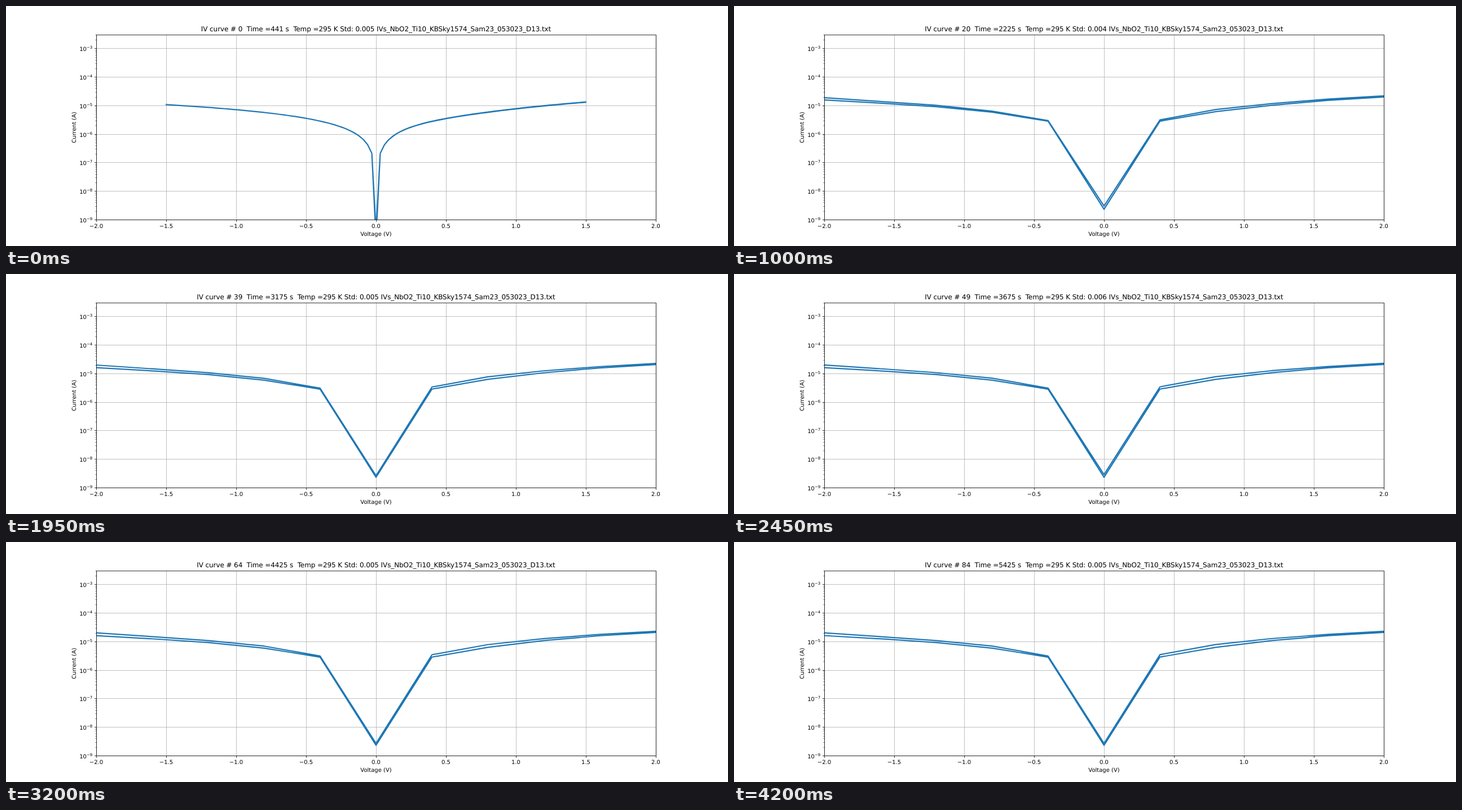
These frames come from a looping animation (1280 px wide and 427 px high, 4.25 s). An HTML page:

```html
<!DOCTYPE html>
<html lang="en">
<head>
<meta charset="utf-8">
<title>IV curve</title>
<style>
  html, body { margin: 0; width: 100%; height: 100%; overflow: hidden; background: #fff; }
  svg { display: block; width: 100vw; height: 100vh; }
  text { font: 10px "DejaVu Sans", sans-serif; text-rendering: geometricPrecision; white-space: pre; }
  #title { font-size: 12px; letter-spacing: -.1px; }
  .mid { text-anchor: middle; }
  .end { text-anchor: end; }
  .sup { font-size: 7px; }
  .grid { stroke: #b0b0b0; stroke-width: .8; }
  .axis { stroke: #000; stroke-width: .8; fill: none; }
  .minor { stroke: #000; stroke-width: .6; }
  #curve { fill: none; stroke: #1f77b4; stroke-width: 2.2; stroke-linejoin: round; stroke-linecap: square; }
</style>
</head>
<body>
<svg viewBox="0 0 1280 427">
  <clipPath id="plot"><rect x="160" y="51.24" width="992" height="328.79"/></clipPath>
  <g id="grid"></g>
  <g clip-path="url(#plot)"><path id="curve"/></g>
  <g id="axes"></g>
  <text id="title" class="mid" x="656" y="45.2"></text>
  <text class="mid" x="656" y="408.5">Voltage (V)</text>
  <text class="mid" transform="translate(123.8 216) rotate(-90)">Current (A)</text>
</svg>
<script>
const STEP_MS = 50, STEPS = 85;
const DECADE = 328.79 / Math.log10(3e6);
const $ = id => document.getElementById(id);
const xOf = volts => 656 + 248 * volts;
const yOf = amps => 380.03 - DECADE * Math.log10(amps / 1e-9);
const snap = v => Math.floor(v + .49) + .5;

function add(parent, tag, attrs, text = '') {
  const el = document.createElementNS('http://www.w3.org/2000/svg', tag);
  for (const key in attrs) el.setAttribute(key, attrs[key]);
  el.textContent = text;
  return parent.appendChild(el);
}
const line = (parent, cls, x1, y1, x2, y2) => add(parent, 'line', { class: cls, x1, y1, x2, y2 });

function drawAxes() {
  const grid = $('grid'), axes = $('axes');
  for (let v = -2; v <= 2; v += .5) {
    const x = snap(xOf(v));
    line(grid, 'grid', x, 51.5, x, 380.5);
    line(axes, 'axis', x, 380.5, x, 384);
    add(axes, 'text', { class: 'mid', x: xOf(v), y: 395 }, v.toFixed(1).replace('-', '\u2212'));
  }
  for (let p = -9; p <= -3; p++) {
    const y = snap(yOf(10 ** p));
    line(grid, 'grid', 160.5, y, 1152.5, y);
    line(axes, 'axis', 157, y, 160.5, y);
    const label = add(axes, 'text', { class: 'end', x: 153.3, y: y + 4.2 }, '10');
    add(label, 'tspan', { class: 'sup', dy: -3.8 }, '\u2212' + -p);
    for (let m = 2; m <= (p === -3 ? 3 : 9); m++) {
      const my = snap(yOf(m * 10 ** p));
      line(axes, 'minor', 158.5, my, 160.5, my);
    }
  }
  add(axes, 'rect', { class: 'axis', x: 160.5, y: 51.5, width: 992, height: 329 });
}

// sweep number, elapsed seconds, standard deviation, height of the upper zero point
const readings = [
  [0, 441, .005, 356], [10, 989, .006, 356], [14, 1208, .005, 356], [15, 1975, .005, 356],
  [20, 2225, .004, 356], [39, 3175, .005, 359], [49, 3675, .006, 357],
  [64, 4425, .005, 358.5], [84, 5425, .005, 358.5]
];
function readingAt(n) {
  const i = Math.max(1, readings.findIndex(r => r[0] >= n));
  const a = readings[i - 1], b = readings[i], f = (n - a[0]) / (b[0] - a[0]);
  return a.map((v, k) => v + (b[k] - v) * f);
}

const toPath = points => 'M' + points.map(p => p[0].toFixed(2) + ' ' + p[1].toFixed(2)).join('L');

// Current through the device for a fine sweep, ohmic with a rise at positive bias
function current(v, lag) {
  if (v < 0) return -v * (7.05e-6 + .07e-6 * -v);
  const t = Math.min(1, Math.max(0, (v - .4) / 1.7));
  return v * (6.95e-6 + 2.55e-6 * t * t * (3 - 2 * t)) * (1 + lag * Math.sin(Math.PI * v / 2));
}
function fineBranch(limit, step, firstLeft, zero, lag) {
  const volts = [];
  for (let v = firstLeft; v < limit; v += step) volts.unshift(-v);
  volts.unshift(-limit);
  volts.push(0);
  for (let v = step; v < limit - 1e-6; v += step) volts.push(v);
  volts.push(limit);
  return toPath(volts.map(v => [xOf(v), yOf(v ? current(v, lag) : zero)]));
}

// Heights at 0.4 V spacing: start value, and how far each branch drifts up
const coarse = {
  upperLeft: [163.3, 170, 176.9, 187.3, 204.1],
  leftDrift: [1.5, 1.5, 1.4, 2, 1.1],
  lowerLeft: [167.3, 173, 179.4, 189.2, 205],
  upperRight: [202.8, 184.4, 173.8, 165.8, 160],
  rightDrift: [2.2, 1.8, 1.9, 1.2, 1],
  lowerRight: [205, 188, 176.8, 168.1, 162],
  leftSettle: [.6, .6, .4, .2, 0],
  rightSettle: [.1, .5, 1.2, 1.2, 1]
};
function coarseBranch(left, leftMove, zero, right, rightMove, drift) {
  const moved = (ys, move) => ys.map((y, i) => y - move[i] * drift);
  const ys = [...moved(left, leftMove), zero, ...moved(right, rightMove)];
  return toPath(ys.map((y, i) => [xOf(-2 + .4 * i), y - .2]));
}

function curvePath(n, zero) {
  if (n < 5) return fineBranch(1.5, .03, .03, 2e-10, -.015) + fineBranch(1.5, .03, .03, 4e-10, .01);
  if (n < 15) return fineBranch(2, .06, .06, 1.3e-9, -.03) + fineBranch(2, .06, .04, 8e-11, .02);
  const drift = n < 20 ? 0 : 1 - Math.exp((20 - n) / 15), c = coarse;
  return coarseBranch(c.upperLeft, c.leftDrift, zero, c.upperRight, c.rightDrift, drift) +
    coarseBranch(c.lowerLeft, c.leftSettle, 361.8, c.lowerRight, c.rightSettle, drift);
}

let shown = -1;
function render(now) {
  const n = Math.floor(now / STEP_MS) % STEPS;
  if (n !== shown) {
    shown = n;
    const [, seconds, std, zero] = readingAt(n);
    $('title').textContent = `IV curve # ${n}  Time =${Math.round(seconds)} s  Temp =295 K ` +
      `Std: ${std.toFixed(3)} IVs_NbO2_Ti10_KBSky1574_Sam23_053023_D13.txt`;
    $('curve').setAttribute('d', curvePath(n, zero));
  }
}

drawAxes();
const start = performance.now();
function tick() {
  render(performance.now() - start);
  requestAnimationFrame(tick);
}
tick();
</script>
</body>
</html>
```
